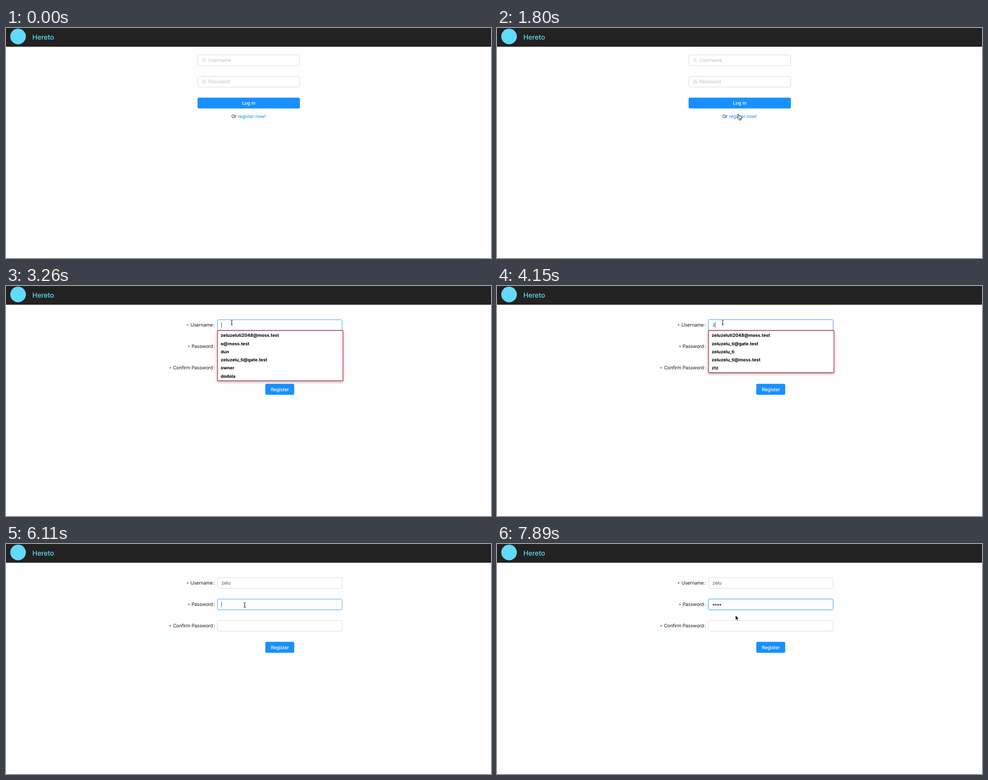
Write an HTML page that moves like this. It is 1086x516 px and loops after 8 s.

```html
<!DOCTYPE html>
<html lang="en">
<head>
<meta charset="utf-8">
<title>Register</title>
<style>
html, body { margin: 0; width: 100%; height: 100%; overflow: hidden; background: #fefefe; }
svg { display: block; width: 100%; height: 100%; }
text { font: 10.67px Inter, Roboto, sans-serif; letter-spacing: -.1px; text-rendering: geometricPrecision; white-space: pre; }
.title { font-size: 15.24px; font-weight: 500; letter-spacing: -.1px; fill: #61dafb; }
.hint { fill: #bfbfbf; }
.label { fill: rgba(0,0,0,.88); letter-spacing: -.22px; }
.typed { fill: rgba(0,0,0,.65); }
.on { fill: #fff; text-anchor: middle; font-weight: 500; letter-spacing: -.17px; }
.star { fill: #f5222d; }
.item { font-size: 9.9px; font-weight: 700; letter-spacing: 0; fill: #000; }
.icon { fill: none; stroke: #bfbfbf; stroke-width: .8; }
.btn { fill: #1890ff; }
.field { fill: #fff; stroke: #d9d9d9; }
.field.focus { stroke: #40a9ff; }
.glow { fill: none; stroke: #1890ff; stroke-opacity: .2; stroke-width: 1.5; }
.drop { filter: drop-shadow(0 2px 3px rgba(0,0,0,.35)); }
</style>
</head>
<body>
<svg viewBox="0 0 1086 516" preserveAspectRatio="none">
  <rect width="1086" height="42" fill="#222"/>
  <circle cx="27" cy="19" r="17.5" fill="#61dafb"/>
  <text class="title" x="59" y="25.8">Hereto</text>

  <g id="login">
    <rect class="field" x="429.5" y="60.6" width="228" height="23.9" rx="3"/>
    <rect class="field" x="429.5" y="108.6" width="228" height="23.9" rx="3"/>
    <g class="icon">
      <circle cx="443.5" cy="70.6" r="2.5"/>
      <path d="M439.9 76.8a3.6 3.6 0 0 1 7.2 0"/>
      <rect x="440.3" y="119.5" width="6.6" height="5" rx=".5"/>
      <path d="M441.6 119.5v-1.6a2 2 0 0 1 4 0v1.6M443.6 121.2v1.5"/>
    </g>
    <text class="hint" x="452.8" y="76.2">Username</text>
    <text class="hint" x="452.8" y="124.2">Password</text>
    <rect class="btn" x="429" y="156.2" width="229" height="24.4" rx="3"/>
    <text class="on" x="543.5" y="172.2">Log in</text>
    <text class="label" x="543.3" y="202.2" text-anchor="middle">Or <tspan fill="#1890ff">register now!</tspan></text>
  </g>

  <g id="form">
    <g id="rows"></g>
    <text id="user" class="typed" x="482.6" y="91.4"></text>
    <g id="dots" fill="#595959"></g>
    <rect id="caret" width="1" height="12.5" fill="#444"/>
    <rect class="btn" x="580.6" y="219.6" width="64.8" height="24.4" rx="3"/>
    <text class="on" x="613.2" y="235.6">Register</text>
    <g id="drop" class="drop">
      <rect id="box" x="473.7" y="100" width="280.7" fill="#fff" stroke="#b9252f" stroke-width="1.3"/>
      <g id="items"></g>
    </g>
  </g>

  <g id="cursor">
    <path id="arrow" d="M0 0V10.6L2.4 8.4 4.1 12.2 5.9 11.4 4.2 7.7H7.6Z" fill="#000" stroke="#fff" stroke-width=".8"/>
    <path id="beam" d="M-2.2 -5.5Q0 -5.5 0 -4V4Q0 5.5 -2.2 5.5M2.2 -5.5Q0 -5.5 0 -4V4Q0 5.5 2.2 5.5M-1.4 1.8H1.4" fill="none" stroke="#111" stroke-width="1"/>
    <path id="hand" d="M-2.6 -5.2C-2.4 -6.6 -.9 -6.6 -.5 -5.4L.6 -1.9C1.2 -2.7 2.3 -2.5 2.7 -1.6 3.4 -2.2 4.4 -1.8 4.7 -.9 5.5 -1.2 6.3 -.6 6.4 .4 6.6 2.4 6.4 3.6 5.5 5L5.4 6.8H-.1C-.8 5 -2.4 3.7 -3.8 2 -4.8 .8 -3.3 -.2 -2.2 .7L-1.2 1.6Z M1.2 2.2V4.8M2.9 2.2V4.8M4.5 2.2V4.8" fill="#fff" stroke="#000" stroke-width=".9" stroke-linejoin="round"/>
  </g>
</svg>
<script>
const LOOP = 8000;
const $ = id => document.getElementById(id);

// screen updates: first, last, count
const bursts = [[150, 1070, 6], [1220, 2240, 8], [2390, 3410, 8], [3560, 4600, 8],
  [4750, 5660, 7], [5810, 6850, 8], [7000, 7890, 7]];

// pointer: time, x, y, shape from then on
const path = [
  [300, 1043, 506, 'arrow'], [520, 880, 392, 'arrow'], [705, 700, 282, 'arrow'],
  [886, 590, 222, 'arrow'], [1070, 548, 203, 'arrow'], [1220, 541.5, 199.5, 'hand'],
  [2050, 541.5, 199.5, 'arrow'], [2390, 540, 196, 'arrow'], [2680, 520, 118, 'arrow'],
  [2820, 505.5, 82.5, 'beam'], [4750, 505.5, 82.5, 'beam'], [4760, 530, 190, 'arrow'],
  [4890, 545, 260, 'arrow'], [5340, 545, 260, 'arrow'], [5500, 538, 165, 'arrow'],
  [5640, 534.5, 137, 'beam'], [7280, 534.5, 137, 'beam'], [7290, 534, 145, 'arrow'],
  [7580, 534, 160, 'arrow'], [LOOP, 534, 160, 'arrow']];

const pageSwap = 2080, userFocus = 3100, userBlur = 5200, passFocus = 5950;
const name = 'zelu';
const nameKeys = [4000, 4295, 4445, 4595];
const dotKeys = [6695, 6845, 6995, 7140];
const recent = ['zeluzeluti2048@moss.test', 'o@moss.test', 'dun', 'zeluzelu_ti@gate.test', 'owner', 'dodola'];
const matches = ['zeluzeluti2048@moss.test', 'zeluzelu_ti@gate.test', 'zeluzelu_ti', 'zeluzelu_ti@moss.test', 'ztz'];

const rows = [['Username', 75.7, 404], ['Password', 123.7, 407], ['Confirm Password', 171.7, 365]];
$('rows').innerHTML = rows.map(([label, y, star]) => `
  <text class="star" x="${star}" y="${y + 17.4}">*</text>
  <text class="label" x="463" y="${y + 15.7}" text-anchor="end">${label}</text>
  <text class="label" x="464.4" y="${y + 15.7}">:</text>
  <rect class="glow" x="472.3" y="${y - 1.2}" width="281.4" height="26.2" rx="4"/>
  <rect class="field" x="473.5" y="${y}" width="279" height="23.8" rx="3"/>`).join('');
$('dots').innerHTML = dotKeys.map((_, i) => `<circle cx="${485.2 + i * 4.95}" cy="136.2" r="1.95"/>`).join('');
const fields = document.querySelectorAll('#rows .field');
const glows = document.querySelectorAll('#rows .glow');

const show = (el, on) => el.style.display = on ? '' : 'none';
const count = (keys, t) => keys.filter(k => t >= k).length;

function snap(t) {
  const slack = 15;
  let out = 0;
  for (const [a, b, n] of bursts) {
    const step = (b - a) / (n - 1);
    if (t + slack >= a) out = a + step * Math.min(n - 1, Math.floor((t + slack - a) / step));
  }
  return out;
}

function drawCursor(t) {
  show($('cursor'), t >= path[0][0]);
  if (t < path[0][0]) return;
  const i = path.findIndex((p, k) => k + 1 < path.length && t < path[k + 1][0]);
  const [t0, x0, y0, shape] = path[i], [t1, x1, y1] = path[i + 1];
  const k = (t - t0) / (t1 - t0);
  $('cursor').setAttribute('transform', `translate(${x0 + (x1 - x0) * k} ${y0 + (y1 - y0) * k})`);
  for (const id of ['arrow', 'beam', 'hand']) show($(id), id === shape);
}

let listKey = '';
function drawList(t, typed) {
  const open = t >= userFocus && t < userBlur;
  show($('drop'), open);
  if (!open) return;
  const list = typed ? matches.filter(m => m.startsWith(name.slice(0, typed))) : recent;
  const key = list.join();
  if (key === listKey) return;
  listKey = key;
  $('box').setAttribute('height', 3 + 18.25 * list.length);
  $('items').innerHTML = list.map((s, i) =>
    `<text class="item" x="480.8" y="${114.4 + 18.25 * i}">${s}</text>`).join('');
}

function drawForm(t) {
  const typed = count(nameKeys, t), dots = count(dotKeys, t);
  const focus = t >= passFocus ? 1 : t >= userFocus && t < userBlur ? 0 : -1;
  const since = focus ? passFocus : userFocus;
  fields.forEach((f, i) => {
    f.classList.toggle('focus', i === focus);
    show(glows[i], i === focus);
    glows[i].style.opacity = Math.min(1, Math.max(0, (t - since - 60) / 300));
  });
  $('user').textContent = name.slice(0, typed);
  [...$('dots').children].forEach((d, i) => show(d, i < dots));

  const lastKey = Math.max(since, ...(focus ? dotKeys : nameKeys).filter(k => k <= t));
  show($('caret'), focus >= 0 && Math.floor((t - lastKey) / 430) % 2 === 0);
  const width = focus ? dots * 4.95 : typed ? $('user').getComputedTextLength() : 0;
  $('caret').setAttribute('x', Math.round(482 + width));
  $('caret').setAttribute('y', focus ? 129 : 81);
  drawList(t, typed);
}

function frame() {
  const t = snap(performance.now() % LOOP);
  show($('login'), t < pageSwap);
  show($('form'), t >= pageSwap);
  if (t >= pageSwap) drawForm(t);
  drawCursor(t);
  requestAnimationFrame(frame);
}
frame();
</script>
</body>
</html>
```
